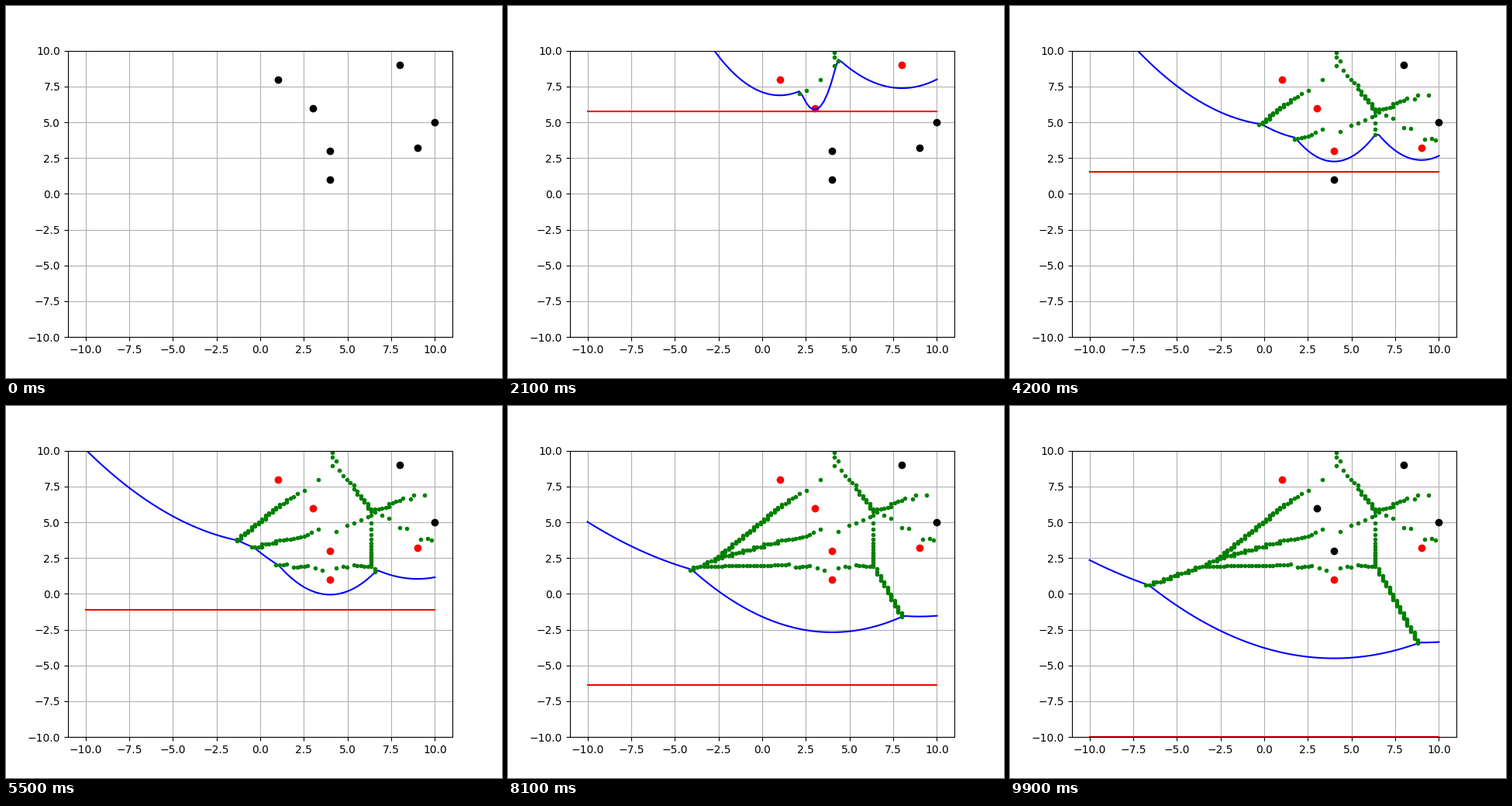
These frames come from a looping animation (640 px wide and 480 px high, 10 s). A matplotlib script:

```python
import numpy as np
import matplotlib.pyplot as plt
from matplotlib.animation import FuncAnimation

FRAMES = 100
SITES = np.array([(1, 8), (8, 9), (3, 6), (10, 5), (4, 3), (9, 3.2), (4, 1)])
XS = np.linspace(-10, 10, 100)
SWEEP = np.linspace(10, -10, FRAMES)
TOUCH = 0.17  # a site stays active while its parabola is this close to the beach


def parabola(site, line):
    px, py = site
    return (XS - px) ** 2 / (2 * (py - line)) + (py + line) / 2


def sweep_state(line):
    """Beach line, breakpoints and active sites for one sweep position."""
    active = np.zeros(len(SITES), bool)
    passed = np.flatnonzero(SITES[:, 1] > line)
    if not len(passed):
        return np.empty(0), np.empty((0, 2)), active
    arcs = np.array([parabola(SITES[k], line) for k in passed])
    beach = arcs.min(axis=0)
    active[passed] = (arcs - beach).min(axis=1) < TOUCH
    cut = np.flatnonzero(np.diff(arcs.argmin(axis=0)))
    breaks = np.column_stack([XS[cut], (beach[cut] + beach[cut + 1]) / 2])
    return beach, breaks, active


states = [sweep_state(line) for line in SWEEP]

fig, ax = plt.subplots(figsize=(6.4, 4.8), dpi=100)
ax.set_xlim(-11, 11)
ax.set_ylim(-10, 10)
ax.grid(True)

idle_dots, = ax.plot([], [], "ko")
active_dots, = ax.plot([], [], "ro")
sweep_line, = ax.plot([], [], "r-")
beach_line, = ax.plot([], [], "b-")
edge_dots, = ax.plot([], [], "g.")


def update(i):
    beach, _, active = states[i]
    idle_dots.set_data(*SITES[~active].T)
    active_dots.set_data(*SITES[active].T)
    sweep_line.set_data([-10, 10], [SWEEP[i]] * 2)
    beach_line.set_data(XS[:len(beach)], beach)
    edge_dots.set_data(*np.vstack([s[1] for s in states[:i + 1]]).T)
    return idle_dots, active_dots, sweep_line, beach_line, edge_dots


anim = FuncAnimation(fig, update, frames=FRAMES, interval=100, repeat=True)
plt.show()
```
